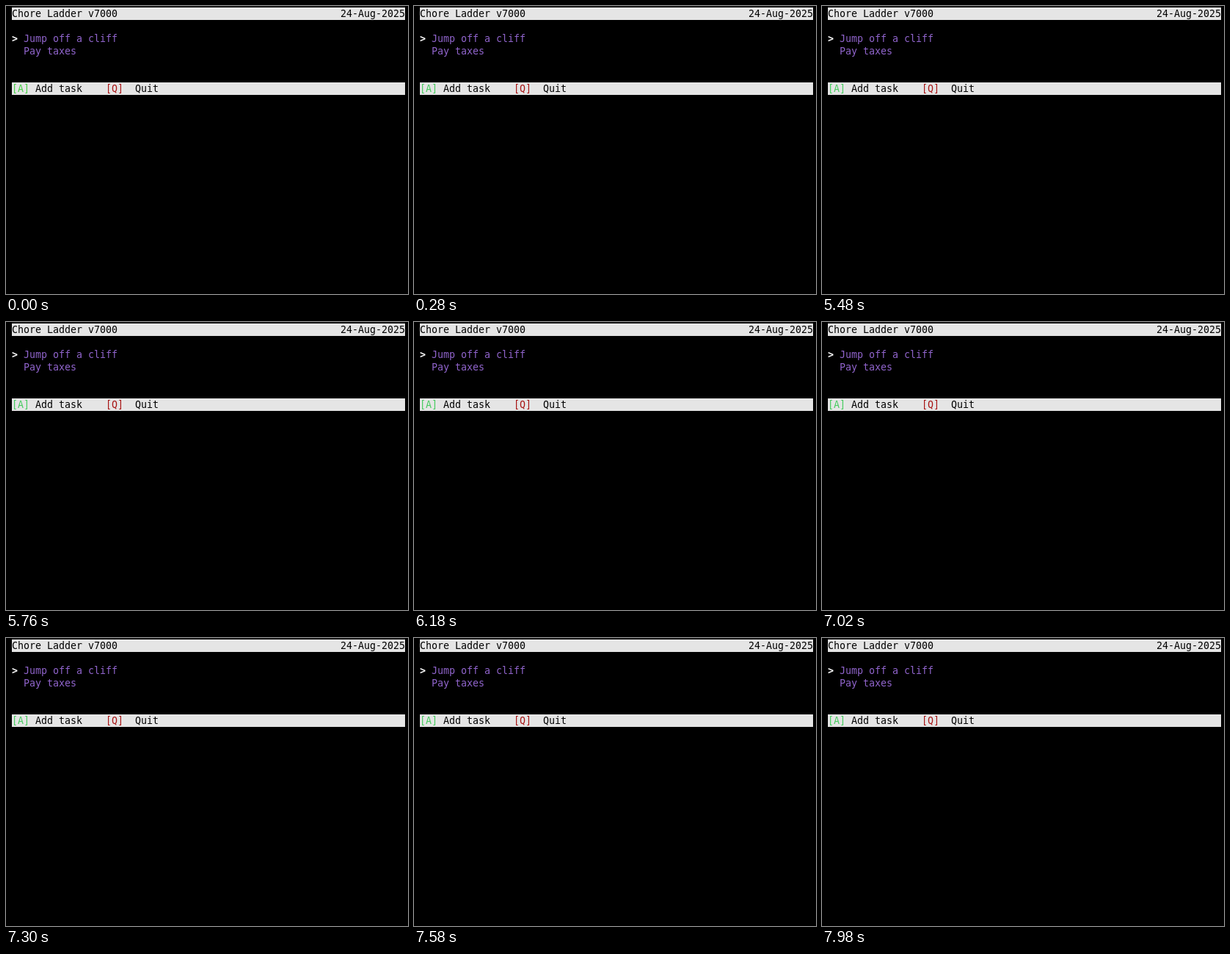
An HTML page that plays this animation: 548x392 px, repeating every 8000 ms.

```html
<!DOCTYPE html>
<html lang="en">
<head>
<meta charset="utf-8">
<title>Task list</title>
<style>
  html, body { margin: 0; width: 100%; height: 100%; overflow: hidden; background: #000; }
  #screen {
    position: absolute; left: 8px; top: 0; width: 536px;
    border-top: 1px solid #2c2c2c; padding-top: 1px;
    font: 13.29px/17px "DejaVu Sans Mono", monospace;
    color: #9064cc; white-space: pre;
  }
  #screen div { height: 17px; }
  #screen .bar { background: #e5e5e5; color: #000; }
  .date { float: right; }
  .pointer { color: #fff; font-weight: bold; }
  .quit { color: #a81414; }
</style>
</head>
<body>
<div id="screen"><div class="bar"><span class="date">24-Aug-2025</span>Chore Ladder v7000</div><div></div><div><span class="pointer">&gt;</span> Jump off a cliff</div><div>  Pay taxes</div><div></div><div></div><div class="bar"><span id="add">[A]</span> Add task    <span class="quit">[Q]</span>  Quit</div></div>
<script>
  const LOOP = 8000, SETTLE = 280, STEPS = 4;
  const add = document.getElementById('add');
  const fresh = [72, 208, 72], settled = [72, 204, 96];

  // The key hint settles to its resting green in a few hard steps.
  function draw(now) {
    const time = now % LOOP;
    const k = Math.min(1, Math.floor(time / SETTLE * STEPS) / STEPS);
    add.style.color = `rgb(${fresh.map((c, i) => c + (settled[i] - c) * k)})`;
    requestAnimationFrame(draw);
  }
  draw(performance.now());
</script>
</body>
</html>
```
